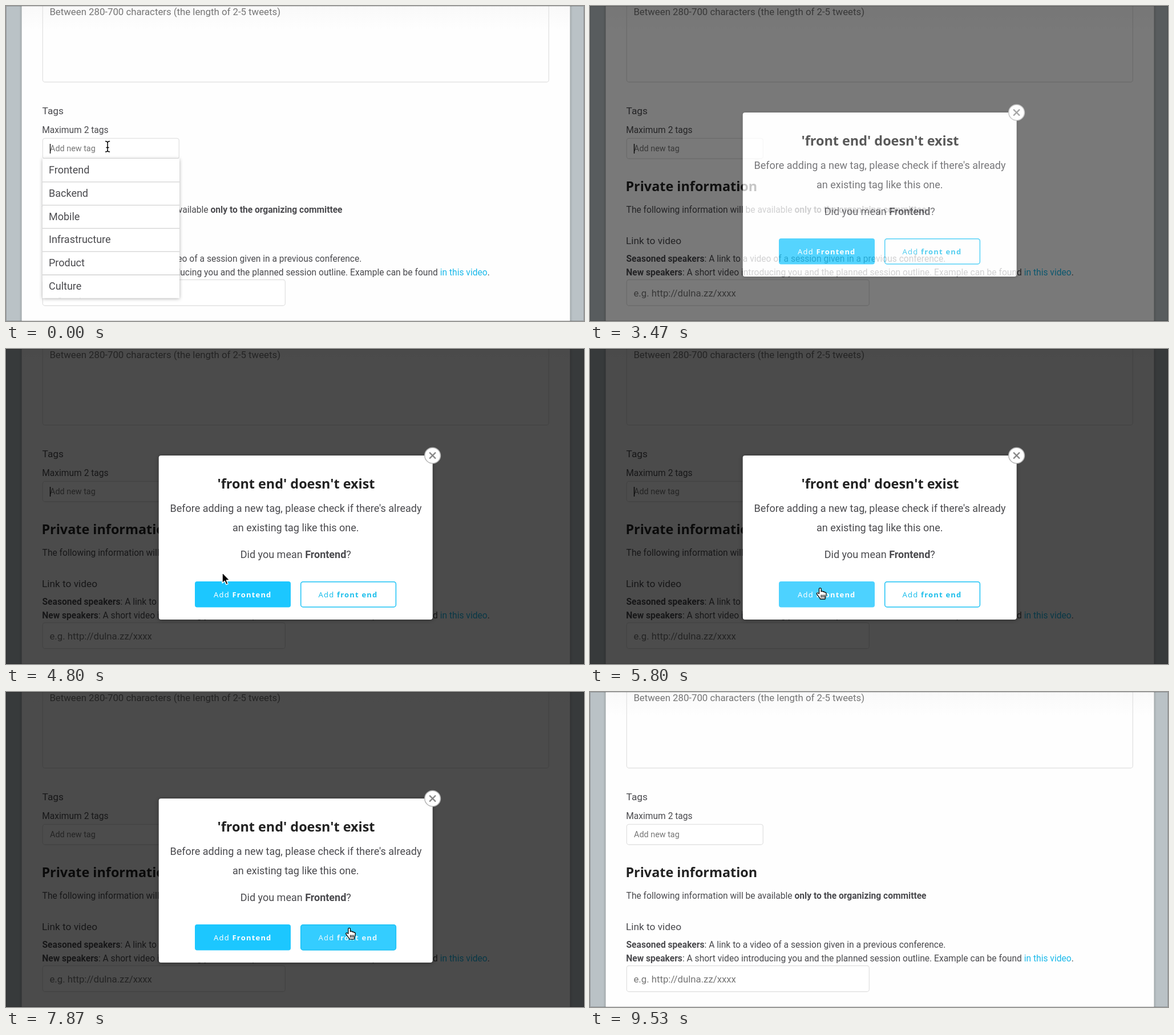
An HTML page that plays this animation: 1013x553 px, repeating every 9.87 s.

```html
<!DOCTYPE html>
<html lang="en">
<head>
<meta charset="utf-8">
<title>Tag form</title>
<style>
  html, body { margin: 0; width: 100%; height: 100%; overflow: hidden; }
  svg { display: block; width: 1013px; height: 553px; }
  text { font: 15.6px Roboto, sans-serif; fill: #4a4a4e; white-space: pre; }
  .b { font-weight: 700; }
  .label { font-size: 17.3px; }
  .hint { font-size: 16.8px; fill: #757575; }
  .field { font-size: 14.4px; }
  .field.empty { fill: #757575; }
  .option, .copy { font-size: 18px; }
  .mark { font-weight: 700; fill: #000; text-decoration: underline; }
  .title { font: 700 23.4px "Noto Sans", sans-serif; fill: #222; }
  .mid { text-anchor: middle; }
  .btn { font: 13px "Noto Sans", sans-serif; letter-spacing: 1.2px; }
  .link { fill: #1bb9ea; }
  .box { fill: #fff; stroke: #e2e2e2; stroke-width: 1.3; }
  #menu rect { filter: drop-shadow(0 1px 3px rgba(0,0,0,.3)); }
  #cursor path { stroke-linejoin: round; stroke-linecap: round; }
</style>
</head>
<body>
<svg viewBox="0 0 1013 553">
  <defs>
    <linearGradient id="top" x2="0" y2="1">
      <stop stop-color="#f9f9f9"/><stop offset="1" stop-color="#fefefe"/>
    </linearGradient>
  </defs>

  <rect width="1013" height="553" fill="#bac2c6"/>
  <rect x="27.5" y="-9" width="961" height="571" fill="#fefefe" style="filter:drop-shadow(0 0 2px rgba(0,0,0,.35))"/>
  <rect x="28" width="960" height="42" fill="url(#top)"/>

  <rect class="box" x="64.3" y="-20" width="887" height="153.5" rx="4" fill-opacity="0"/>
  <text class="hint" x="76.4" y="15.8">Between 280-700 characters (the length of 2-5 tweets)</text>
  <text class="label" x="63.6" y="190">Tags</text>
  <text x="63.2" y="223.4">Maximum 2 tags</text>
  <rect class="box" x="64.3" y="232.3" width="239" height="35.7" rx="4"/>
  <text class="field" id="field" x="77" y="254.8"></text>
  <rect id="caret" y="242" width="1.4" height="17" fill="#111"/>

  <text class="title" x="62.4" y="325">Private information</text>
  <text x="63.6" y="362.5">The following information will be available <tspan class="b">only to the organizing committee</tspan></text>
  <text class="label" x="63" y="417.5">Link to video</text>
  <text x="63.5" y="449"><tspan class="b">Seasoned speakers</tspan>: A link to a video of a session given in a previous conference.</text>
  <text x="63.2" y="473"><tspan class="b">New speakers</tspan>: A short video introducing you and the planned session outline. Example can be found <tspan class="link">in this video</tspan>.</text>
  <rect class="box" x="64.3" y="480.5" width="425" height="45.5" rx="4"/>
  <text class="hint" x="76.4" y="510">e.g. http://dulna.zz/xxxx</text>

  <g id="menu"></g>

  <g id="modal">
    <rect width="1013" height="553" fill="#000" opacity=".7"/>
    <rect x="267.7" y="187" width="480" height="288" rx="4" fill="#fff" style="filter:drop-shadow(0 1px 3px rgba(0,0,0,.4))"/>
    <text class="title mid" x="508.5" y="245">'front end' doesn't exist</text>
    <text class="copy mid" x="508" y="285.8">Before adding a new tag, please check if there's already</text>
    <text class="copy mid" x="507.8" y="320.3">an existing tag like this one.</text>
    <text class="copy mid" x="507.8" y="367.3">Did you mean <tspan class="b">Frontend</tspan>?</text>
    <rect id="first" x="331" y="408" width="168" height="45.5" rx="4"/>
    <text class="btn" x="364" y="435.7" style="fill:#fff">Add <tspan class="b">Frontend</tspan></text>
    <rect id="second" x="516.7" y="408.7" width="166.7" height="44.2" rx="4" stroke="#1cc2f5" stroke-width="1.5"/>
    <text class="btn" id="secondText" x="547.5" y="435.7">Add <tspan class="b">front end</tspan></text>
    <circle cx="747.6" cy="187" r="13.8" fill="#fff" stroke="#b8b8b8" stroke-width="1.6"/>
    <path id="cross" d="M742.2 181.6l10.8 10.8m0-10.8l-10.8 10.8" fill="none" stroke-width="2.2"/>
  </g>

  <g id="cursor">
    <g id="beam" fill="none">
      <path d="M-3.5-9.5Q0-9.5 0-6.5Q0-9.5 3.5-9.5M0-6.5V6.5M-3.5 9Q0 9 0 6Q0 9 3.5 9M-2 1.5H2" stroke="#fff" stroke-width="3.4"/>
      <path d="M-3.5-9.5Q0-9.5 0-6.5Q0-9.5 3.5-9.5M0-6.5V6.5M-3.5 9Q0 9 0 6Q0 9 3.5 9M-2 1.5H2" stroke="#000" stroke-width="1.5"/>
    </g>
    <path id="arrow" d="M0 0V18.5L4.2 14.6L7 21L10 19.7L7.3 13.4H13Z" fill="#000" stroke="#fff" stroke-width="1.4"/>
    <g id="hand" stroke="#000" stroke-width="1.3">
      <path d="M-2.5 9.5V1.2C-2.5-1 1.2-1 1.2 1.2V6C1.8 4.6 4.4 4.9 4.6 6.5C5.4 5.6 7.3 6 7.5 7.5C8.6 6.9 10 7.6 10 9C10 13.5 8.3 14.5 8 19H-.5C-1 16-5 13.5-6.5 10C-7 7.7-4.5 7.3-2.5 9.5Z" fill="#fff"/>
      <path d="M1.3 12v4M4 12v4M6.6 12v4" fill="none"/>
    </g>
  </g>
  <rect x=".5" y=".5" width="1012" height="552" fill="none" stroke="#000" stroke-opacity=".2"/>
</svg>
<script>
const LOOP = 9870, OPEN = 3330, CLOSE = 9230;
const $ = id => document.getElementById(id);
const options = ['Frontend', 'Backend', 'Mobile', 'Infrastructure', 'Product', 'Culture'];
const typed = 'front end';
const keyTimes = [800, 1000, 1270, 1400, 1530, 1800, 2070, 2200, 2330];

// time, x, y of the pointer
const pointer = [
  [4000, 178, 247], [4300, 240, 217], [4930, 396, 414], [5270, 404, 420],
  [6470, 404, 420], [6730, 464.5, 440.5], [6930, 560, 448], [7200, 580, 445],
  [7730, 580, 445], [8150, 665, 330], [8600, 753, 185.5]
];

const clamp = v => Math.max(0, Math.min(1, v));
const ramp = (t, start, length) => clamp((t - start) / length);
const smooth = v => v * v * (3 - 2 * v);
const pulse = (t, from, to, length) => ramp(t, from, length) - ramp(t, to, length);
const show = (el, on) => el.style.display = on ? '' : 'none';
const mix = (a, b, k) => `rgb(${a.map((v, i) => Math.round(v + (b[i] - v) * k))})`;

function pointerAt(t) {
  let i = 1;
  while (i < pointer.length - 1 && t > pointer[i][0]) i++;
  const [t0, x0, y0] = pointer[i - 1], [t1, x1, y1] = pointer[i];
  const k = smooth(ramp(t, t0, t1 - t0));
  return [x0 + (x1 - x0) * k, y0 + (y1 - y0) * k];
}

let menuKey;
function drawMenu(query, visible) {
  const needle = query.trim(), n = needle.length, row = 40.8;
  const key = visible + needle;
  if (key === menuKey) return;
  menuKey = key;
  const rows = visible ? options.filter(o => o.toLowerCase().startsWith(needle)) : [];
  if (!rows.length) { $('menu').innerHTML = ''; return; }
  $('menu').innerHTML =
    `<rect x="64" y="268" width="240" height="${rows.length * row}" fill="#fff"/>` +
    rows.map((o, i) => {
      const line = i ? `<path d="M64 ${268 + i * row}h240" stroke="#d2d2d2" stroke-width="1.3"/>` : '';
      return `${line}<text class="option" x="75" y="${294 + i * row}"><tspan class="mark">${o.slice(0, n)}</tspan>${o.slice(n)}</text>`;
    }).join('');
}

function caretOn(t) {
  if (t < 800) return t < 270 || t >= 770;
  if (t < 2800) return true;
  if (t < OPEN) return false;
  return t < CLOSE && Math.floor((t - OPEN) / 500) % 2 === 0;
}

function drawField(t) {
  const query = t < OPEN ? typed.slice(0, keyTimes.filter(k => t >= k).length) : '';
  const field = $('field');
  const content = query || 'Add new tag';
  if (field.textContent !== content) field.textContent = content;
  field.classList.toggle('empty', !query);
  $('caret').setAttribute('x', 76.8 + (query ? field.getComputedTextLength() : 0));
  show($('caret'), caretOn(t));
  drawMenu(query, t < OPEN);
}

function drawModal(t) {
  const opacity = smooth(pulse(t, OPEN - 40, CLOSE, 270));
  $('modal').style.opacity = opacity;
  show($('modal'), opacity > 0);
  const cyan = [28, 199, 255], white = [255, 255, 255];
  $('first').style.fill = mix(cyan, [77, 210, 255], pulse(t, 5000, 6480, 200));
  const filled = pulse(t, 6500, 7850, 200);
  $('second').style.fill = mix(white, cyan, filled);
  $('secondText').style.fill = mix([28, 190, 235], white, filled);
  $('cross').style.stroke = mix([135, 135, 135], [34, 34, 34], ramp(t, 8530, 130));
}

function drawCursor(t) {
  const [x, y] = t < 800 ? [178, 247] : pointerAt(t);
  const overButton = y > 408 && y < 454 && x > 331 && x < 684;
  $('cursor').setAttribute('transform', `translate(${x} ${y})`);
  show($('cursor'), t < 800 || (t >= 4000 && t < 9500));
  show($('beam'), t < 800);
  show($('arrow'), t >= 800 && !overButton);
  show($('hand'), t >= 800 && overButton);
}

const start = performance.now();
function frame() {
  const t = (performance.now() - start) % LOOP;
  drawField(t);
  drawModal(t);
  drawCursor(t);
  requestAnimationFrame(frame);
}
frame();
</script>
</body>
</html>
```
